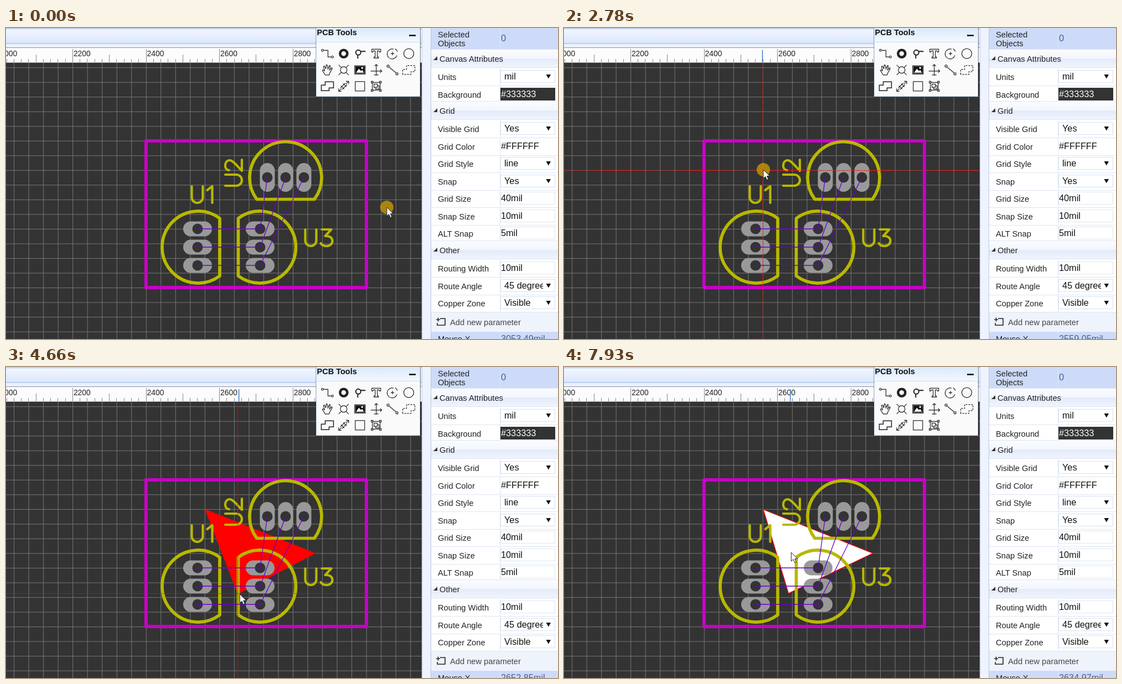
An HTML page for the animation above (8000 ms loop, 997x562 px).

```html
<!DOCTYPE html>
<html lang="en">
<head>
<meta charset="utf-8">
<title>PCB solid region</title>
<style>
html, body { margin: 0; width: 100%; height: 100%; overflow: hidden; background: #333; }
svg { display: block; width: 100%; height: 100%; font-family: "Liberation Sans", Arial, sans-serif; }
text { white-space: pre; }
.label { font-size: 14.67px; fill: #222; }
.value { font-size: 16.3px; fill: #111; }
.silk { fill: none; stroke: #b8b800; stroke-width: 5.7; stroke-linejoin: round; }
.glyph { fill: none; stroke: #b8b800; stroke-width: 4.2; stroke-linecap: round; stroke-linejoin: round; }
.pad { fill: #999; }
.hole { fill: #333; }
.net { stroke: #6a00cc; stroke-width: 1.3; fill: none; }
.icon { fill: none; stroke: #222; stroke-width: 1.2; }
.cross { stroke: #f00; stroke-width: 1.2; stroke-dasharray: 2.4 1.3; }
</style>
</head>
<body>
<svg viewBox="0 0 997 562" preserveAspectRatio="none">
  <defs>
    <linearGradient id="bar" x2="0" y2="1"><stop stop-color="#f3f7ff"/><stop offset="1" stop-color="#dae6fc"/></linearGradient>
    <linearGradient id="head" x2="0" y2="1"><stop stop-color="#fbfcff"/><stop offset=".5" stop-color="#f3f6fe"/><stop offset=".52" stop-color="#e3eafa"/><stop offset="1" stop-color="#f1f5fd"/></linearGradient>
    <linearGradient id="title" x2="0" y2="1"><stop stop-color="#d8e8fb"/><stop offset="1" stop-color="#f2f8ff"/></linearGradient>
    <clipPath id="canvas"><rect y="63" width="751" height="499"/></clipPath>
    <clipPath id="valueClip"><rect x="893" width="77" height="580"/></clipPath>
    <path id="u" d="M0 0V20a10 10 0 0 0 20 0V0"/>
  </defs>

  <rect width="997" height="562" fill="#333"/>
  <g clip-path="url(#canvas)">
    <path id="grid" stroke="#777" fill="none"/>
    <rect id="board" x="253" y="204" width="398" height="265" fill="none" stroke="#c800c8" stroke-width="6" stroke-linejoin="round"/>
    <polygon id="region" stroke="red"/>
    <g id="parts"></g>
    <path class="silk" d="M386 344A65 65 0 1 0 386 448Z"/>
    <path class="silk" d="M419.5 344A65 65 0 1 1 419.5 448Z"/>
    <path class="silk" d="M453 309.500A65 65 0 1 1 557 309.500Z"/>
    <g class="glyph">
      <g transform="translate(335.500 286)"><use href="#u"/><path d="M28 7L37 0V30"/></g>
      <g transform="translate(396 285) rotate(-90)"><use href="#u"/><path d="M28 7C28-3 46-2 46 8C46 14 35 22 27 30H47"/></g>
      <g transform="translate(540.500 364)"><use href="#u"/><path d="M30 0H47L36 12C53 10 53 30 38 30C33 30 30 28 28 25"/></g>
    </g>
    <path class="net" d="M346 363H459L472 270M346 396H459L505 270M346 429H459L538 270"/>
    <g id="crosshair"><path id="crossX" class="cross"/><path id="crossY" class="cross"/></g>
  </g>

  <g id="ruler">
    <rect width="752" height="37" fill="#eaf1fd"/>
    <rect y="2" width="752" height="26" fill="url(#bar)"/>
    <path d="M0 1.500H752M0 28H752" stroke="#96b4e2"/>
    <rect y="35" width="751" height="28" fill="#fcfcfc"/>
    <path d="M0 35.500H751" stroke="#8a93a5"/>
    <path d="M0 62.500H751" stroke="#aaa"/>
    <path id="ticks" stroke="#888" fill="none"/>
    <g id="rulerText" font-size="13.900" fill="#222"></g>
    <path id="rulerMark" stroke="#3a7fd0" stroke-width="1.500"/>
  </g>

  <g id="toolbox">
    <rect x="559" y="-4" width="191" height="130" fill="#111" opacity=".25"/>
    <rect x="560.500" y="-2" width="187" height="125.500" fill="#fafafa" stroke="#c3d6ea"/>
    <rect x="561" y="-2" width="186" height="27" fill="url(#title)"/>
    <path d="M561 25.500H748" stroke="#d0dcf0"/>
    <text x="561.500" y="13" font-size="14.500" font-weight="bold" fill="#111">PCB Tools</text>
    <path d="M728 13.500H740" stroke="#111" stroke-width="2.600"/>
    <rect id="hot" x="566" y="90" width="29" height="29" fill="#a9d6e6"/>
    <g id="icons"></g>
  </g>

  <g id="panel">
    <rect x="751" width="246" height="562" fill="#fff"/>
    <rect x="754" width="13" height="562" fill="#eef3fd"/>
    <path d="M752.500 0V562M767.500 0V562" stroke="#b4c8e8"/>
    <g id="rows"></g>
  </g>

  <circle id="click" r="12" fill="#dba500" opacity=".7"/>
  <path id="arrow" d="M0 0V16L3.700 12.600L6.300 18.500L9 17.300L6.500 11.600H11.500Z" fill="#fff" stroke="#222"/>
  <path id="hand" d="M-2 1.500Q0-1.500 2 1.500V7Q4 5.500 5.500 7.500Q7.500 6.500 8.500 8.500Q11 8 11 10.500V15Q11 18 9 21H0Q-2 17-6 13Q-6 10-2 12Z" fill="#fff" stroke="#222" stroke-width="1.200"/>
</svg>
<script>
const $ = id => document.getElementById(id);
const set = (id, attrs) => { for (const k in attrs) $(id).setAttribute(k, attrs[k]); };
const show = (id, on) => { $(id).style.display = on ? '' : 'none'; };

const SCALE = 0.663, ORIGIN = 253, TIP = 1.6, SNAP_Y = 257;
const toPx = mil => ORIGIN + (mil - 2400) * SCALE;
const crisp = v => Math.floor(v) + .5;

function buildCanvas() {
  let d = '', ticks = '', labels = '';
  for (let mil = 2000; mil < 3160; mil += 40) d += `M${toPx(mil) + .3} 63V562`;
  for (let i = 0; i < 19; i++) d += `M0 ${71.7 + i * 26.52}H751`;
  for (let mil = 2000; mil < 3160; mil += 20) {
    const top = mil % 200 === 0 ? 38 : mil % 100 === 0 ? 48 : 56;
    ticks += `M${crisp(toPx(mil))} ${top}V62`;
    if (mil % 200 === 0) labels += `<text x="${toPx(mil) + 1.5}" y="51">${mil}</text>`;
  }
  set('grid', { d });
  set('ticks', { d: ticks });
  $('rulerText').innerHTML = labels;

  const pad = (x, y, w, h) =>
    `<rect class="pad" x="${x - w / 2}" y="${y - h / 2}" width="${w}" height="${h}" rx="13.4"/><circle class="hole" cx="${x}" cy="${y}" r="9.5"/>`;
  let pads = '';
  for (const y of [363, 396, 429]) pads += pad(346, y, 52, 27) + pad(459, y, 52, 27);
  for (const x of [472, 505, 538]) pads += pad(x, 270, 27, 52);
  $('parts').innerHTML = pads;
}

function buildIcons() {
  const ring = (x, y, r, extra = '') => `<circle cx="${x}" cy="${y}" r="${r}" ${extra}/>`;
  const icons = [
    `<path d="M-7-6H1V6H7"/>` + ring(-9, -6, 1.8) + ring(9, 6, 1.8),
    ring(0, 0, 6.5, 'stroke-width="4.5"'),
    ring(-3, -2, 4.5, 'stroke-width="2"') + '<path d="M1-4H10M-4 3V9" stroke-width="2"/>',
    '<path d="M-8-8H8V-3H6L5-5H2V6H4V8H-4V6H-2V-5H-5L-6-3H-8Z"/>',
    '<path d="M8 3A9 9 0 1 1 2-8M-3 0H3M0-3V3M5-9L9-4"/>',
    ring(0, 0, 9),
    '<path d="M-4 9L-9 1Q-8-2-5 2L-7-6Q-5-9-3-2L-2-9Q0-11 1-2L4-8Q6-9 4 0L8-4Q10-3 5 4L3 9Z"/>',
    ring(0, 0, 6) + '<path d="M-9-9L-4-4M9-9L4-4M-9 9L-4 4M9 9L4 4"/>',
    '<rect x="-9.500" y="-7.500" width="19" height="15"/><path d="M-8 6V-6H8V6Z" fill="#111"/><path d="M-7 5L-2-2L2 2L4 0L7 5Z" fill="#fff" stroke="none"/><circle cx="4" cy="-3.500" r="1.700" fill="#fff" stroke="none"/>',
    '<path d="M-10 2H10M0-10V10M-3-7L0-10L3-7M7-1L10 2L7 5M-4 9H4"/>',
    '<path d="M-6-5L6 5"/>' + ring(-8, -7, 2) + ring(8, 7, 2),
    '<path d="M-11 8V-1H-4V-8H11V3H4V8Z" stroke-dasharray="3 2"/>',
    '<path d="M-11 8V-2H-4V-8H11V3H3V8Z" stroke-width="1.500"/>',
    '<path d="M-9 9L-4 4M4-4L9-9M-5-1L1 5M-1-5L5 1M-6 3L3-6M-3 6L6-3M-9 4V9H-4M4-9H9V-4"/>',
    '<rect x="-8.500" y="-8.500" width="17" height="17"/>',
    '<rect x="-7" y="-7" width="14" height="14"/><rect x="-4" y="-4" width="6" height="6"/><path d="M-1 2V5H5V-1H2"/><path d="M-9-9h3v3h-3zM6-9h3v3h-3zM-9 6h3v3h-3zM6 6h3v3h-3z" fill="#fff"/>'
  ];
  $('icons').innerHTML = icons.map((shape, i) =>
    `<g class="icon" transform="translate(${580.5 + i % 6 * 29.4} ${46.3 + Math.floor(i / 6) * 29.5})">${shape}</g>`).join('');
}

function buildPanel() {
  const text = (x, y, s, cls = 'label', extra = '') => `<text x="${x}" y="${y}" class="${cls}" ${extra}>${s}</text>`;
  const rect = (x, y, w, h, fill, extra = '') => `<rect x="${x}" y="${y}" width="${w}" height="${h}" fill="${fill}" ${extra}/>`;
  const header = (y, s) => rect(768, y - 23, 229, 34, 'url(#head)') +
    `<path d="M768 ${y - 22.5}H997M768 ${y + 10.5}H997" stroke="#dbe5f5"/><path d="M779 ${y - 10}V${y - 3}H772Z" fill="#333"/>` + text(783, y, s);
  const boxes = {
    input: ['#fff', '#dfe6f0'],
    select: ['#fff', '#d6e2f2'],
    dark: ['#333', '#333']
  };
  const row = (y, label, value, kind = 'input') => {
    const [fill, stroke] = boxes[kind] || ['none', 'none'];
    const arrow = kind === 'select' ? `<path d="M975.5 ${y - 10}H984L979.8 ${y - 2.5}Z" fill="#111"/>` : '';
    return `<path d="M768 ${y + 10.5}H997M892.5 ${y - 21}V${y + 10}" stroke="#dde6f4"/>` +
      rect(893.5, y - 17.5, 98, 22, fill, `stroke="${stroke}"`) + text(780, y, label) +
      text(kind === 'select' ? 900 : 894, y - 1, value, 'value', `clip-path="url(#valueClip)"${kind === 'dark' ? ' style="fill:#fff"' : ''}`) + arrow;
  };
  $('rows').innerHTML =
    rect(768, 0, 229, 38, '#cddbf8') + text(780, 17, 'Selected') + text(780, 33, 'Objects') +
    text(894, 24, '0', 'value', 'style="fill:#3f6099"') + '<path d="M892.5 0V38" stroke="#dde6f4"/>' +
    header(61, 'Canvas Attributes') +
    row(94, 'Units', 'mil', 'select') + row(126, 'Background', '#333333', 'dark') +
    header(155, 'Grid') +
    row(188, 'Visible Grid', 'Yes', 'select') + row(220, 'Grid Color', '#FFFFFF', 'plain') +
    row(251, 'Grid Style', 'line', 'select') + row(283, 'Snap', 'Yes', 'select') +
    row(314, 'Grid Size', '40mil') + row(346, 'Snap Size', '10mil') + row(377, 'ALT Snap', '5mil') +
    header(407, 'Other') +
    row(440, 'Routing Width', '10mil') + row(472, 'Route Angle', '45 degrees', 'select') +
    row(503, 'Copper Zone', 'Visible', 'select') +
    rect(768, 514, 229, 35, '#eff3fc') + text(802, 536.5, 'Add new parameter', 'label', 'style="fill:#444"') +
    '<path d="M784 525H793V537H779V533M777 527H784M780.500 523.500V530.500" fill="none" stroke="#222" stroke-width="1.600"/>' +
    rect(768, 549, 229, 13, '#cddbf8') + '<path d="M892.5 549V562" stroke="#dde6f4"/>' +
    text(780, 567, 'Mouse-X') + text(894, 567, '', 'value', 'id="mouseX" style="fill:#4a5f88"');
}

// start, end, steps, x, y, ease-out power per axis
const moves = [
  [530, 1300, 11, 590, 109, 1.7],
  [1380, 1380, 1, 587, 107],
  [1530, 1610, 2, 584, 104],
  [1930, 2700, 11, 360.05, 256, 2],
  [3010, 3800, 11, 561.6, 338, 2],
  [3950, 4750, 11, 416.6, 412, 1.354, 1.6],
  [4810, 4810, 1, 414.6, 412],
  [4960, 4960, 1, 412.6, 412],
  [5450, 5450, 1, 410.385, 412],
  [6140, 6300, 3, 410.385, 395],
  [7180, 7380, 4, 410.385, 352],
  [7610, 7700, 2, 410.385, 335]
];
const clicks = [[0, 530], [1760, 1930], [2780, 3010], [3800, 3950], [5760, 6140]];

function pointer(t) {
  let x = 687.864, y = 324;
  for (const [start, end, n, toX, toY, ex = 1, ey = ex] of moves) {
    if (t < start) break;
    const step = n > 1 ? Math.min(n, Math.floor((t - start) / (end - start) * (n - 1) + .15) + 1) : 1;
    const left = 1 - step / n;
    x += (toX - x) * (1 - left ** ex);
    y += (toY - y) * (1 - left ** ey);
  }
  return { x, y };
}

function render(t) {
  const { x, y } = pointer(t);
  const inTools = x > 561 && y < 125;
  const onIcon = x > 566 && x < 595 && y > 90 && y < 119;
  const mil = inTools ? 2929.42 : 2400 + (x - TIP - ORIGIN) / SCALE;
  const snapX = toPx(Math.round(mil / 10) * 10);
  const snapY = SNAP_Y + Math.round((y - 1 - SNAP_Y) / (SCALE * 10)) * SCALE * 10;

  $('mouseX').textContent = mil.toFixed(2) + 'mil';
  set('rulerMark', { d: `M${toPx(mil)} 40V62` });
  show('hot', onIcon);
  show('hand', onIcon);
  show('arrow', !onIcon);
  const move = `translate(${x} ${y})`;
  set('arrow', { transform: move });
  set('hand', { transform: move });

  show('click', clicks.some(([a, b]) => t >= a && t < b));
  set('click', { cx: x, cy: y });

  const nearEdge = Math.abs(x - 651) < 7 && y > 204 || Math.abs(y - 204) < 7 && x < 651;
  set('board', { stroke: t > 530 && t < 1300 && nearEdge ? '#fff' : '#c800c8' });

  show('crosshair', t >= 1930 && t < 7610);
  set('crossX', { d: `M1 ${crisp(snapY)}H750` });
  set('crossY', { d: `M${crisp(snapX)} 63V562` });

  const corner = t < 5760 ? [snapX, snapY] : [405.5, 409.2];
  const filled = t >= 3950, hovered = t >= 7850;
  const points = [[360, 257.5], ...(filled ? [[558, 336.6]] : []), corner];
  show('region', t >= 3010);
  set('region', { points: points.join(' '), fill: hovered ? '#fff' : 'red', 'stroke-width': 1.3 });
}

buildCanvas();
buildIcons();
buildPanel();
const begin = performance.now();
(function tick() {
  render((performance.now() - begin) % 8000);
  requestAnimationFrame(tick);
})();
</script>
</body>
</html>
```
